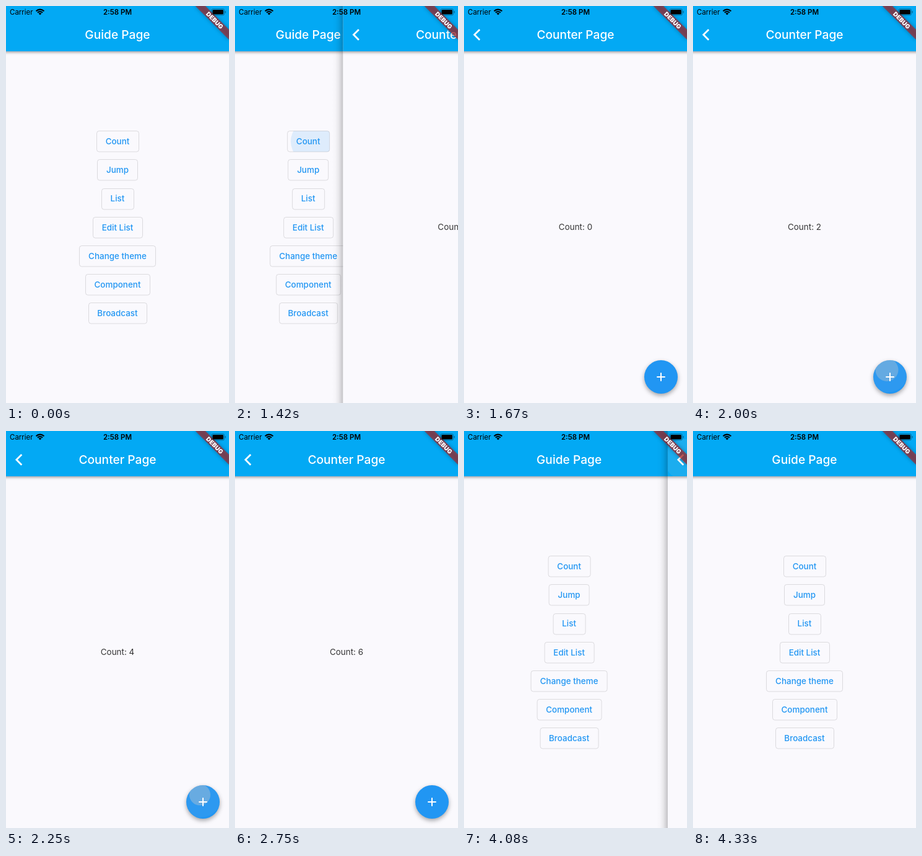
An HTML page with a canvas for the animation above (5080 ms loop, 360 by 640 pixels).

```html
<!DOCTYPE html>
<html lang="en">
<head>
<meta charset="utf-8">
<title>Guide and counter pages</title>
<style>
  html, body { margin: 0; width: 100%; height: 100%; overflow: hidden; background: #faf9fd; }
  canvas { display: block; }
</style>
</head>
<body>
<canvas id="stage" width="360" height="640"></canvas>
<script>
const ctx = document.getElementById('stage').getContext('2d');
const W = 360, H = 640, LOOP = 5080, STEP = 1000 / 12;
const BACKGROUND = '#faf9fd', HEADER = '#03a9f4', ACCENT = '#2196f3';
const HEADER_HEIGHT = 73, HEADER_MID = 46.2;
const MENU = ['Count', 'Jump', 'List', 'Edit List', 'Change theme', 'Component', 'Broadcast'];

const PUSH = { start: 1354.4, duration: 310 };
const POP = { start: 3859, duration: 460 };
const FIRST_SLIDE = 1416, FIRST_RETURN = 3916;
const TAPS = [1790, 1910, 2040, 2170, 2340, 2500];
const TAP_HOLD = 75, RIPPLE_LIFE = 240;

const clamp = v => Math.max(0, Math.min(1, v));

// Cubic Bezier (0.35, 0.91, 0.33, 0.97), solved by bisection.
function slideEase(t) {
  if (t <= 0 || t >= 1) return clamp(t);
  const bezier = (a, b, s) => 3 * (1 - s) ** 2 * s * a + 3 * (1 - s) * s * s * b + s ** 3;
  let low = 0, high = 1;
  for (let i = 0; i < 30; i++) {
    const mid = (low + high) / 2;
    if (bezier(0.35, 0.33, mid) < t) low = mid; else high = mid;
  }
  return bezier(0.91, 0.97, low);
}

const progress = (slide, time) => slideEase((time - slide.start) / slide.duration);

function scoped(draw) {
  ctx.save();
  draw();
  ctx.restore();
}

function setShadow(offset, blur, alpha) {
  ctx.shadowOffsetY = offset;
  ctx.shadowBlur = blur;
  ctx.shadowColor = `rgba(0,0,0,${alpha})`;
}

function label(text, x, mid, size, color, weight = 400, align = 'center') {
  ctx.font = `${weight} ${size}px Inter, sans-serif`;
  ctx.textAlign = align;
  ctx.fillStyle = color;
  ctx.fillText(text, x, mid + size * 0.364);
}

function circle(x, y, r, color) {
  ctx.beginPath();
  ctx.arc(x, y, r, 0, 2 * Math.PI);
  ctx.fillStyle = color;
  ctx.fill();
}

function strokeLine(points, width, color) {
  ctx.beginPath();
  points.forEach(([x, y]) => ctx.lineTo(x, y));
  ctx.lineWidth = width;
  ctx.strokeStyle = color;
  ctx.stroke();
}

function pageBase(title) {
  ctx.fillStyle = BACKGROUND;
  ctx.fillRect(0, 0, W, H);
  scoped(() => {
    ctx.beginPath();
    ctx.rect(0, 0, W, H);
    ctx.clip();
    setShadow(1.5, 4, 0.35);
    ctx.fillStyle = HEADER;
    ctx.fillRect(-10, -10, W + 20, HEADER_HEIGHT + 10);
  });
  label(title, W / 2, HEADER_MID, 19.2, '#fff', 500);
}

function menuButton(text, index, time) {
  const mid = 218.4 + index * 46.08, height = 34;
  ctx.font = '500 13.44px Inter, sans-serif';
  const width = Math.round(ctx.measureText(text).width + 30);
  const left = Math.round(W / 2 - width / 2) + 0.5;
  ctx.beginPath();
  ctx.roundRect(left, Math.round(mid - height / 2) + 0.5, width - 1, height - 0.5, 3.8);
  if (index === 0 && time > FIRST_SLIDE && time < 1700) {
    scoped(() => {
      const age = time - FIRST_SLIDE;
      ctx.clip();
      circle(186, mid, 34 + age * 0.2, `rgba(33,150,243,${0.13 * clamp(1 - age / 280)})`);
    });
    ctx.beginPath();
    ctx.roundRect(left, Math.round(mid - height / 2) + 0.5, width - 1, height - 0.5, 3.8);
  }
  ctx.lineWidth = 1;
  ctx.strokeStyle = 'rgba(0,0,0,0.12)';
  ctx.stroke();
  label(text, W / 2, mid, 13.44, ACCENT, 500);
}

function guidePage(time) {
  pageBase('Guide Page');
  MENU.forEach((text, i) => menuButton(text, i, time));
}

function addButton(time) {
  const x = 318, y = 598, r = 27;
  scoped(() => {
    setShadow(3, 7, 0.35);
    circle(x, y, r, ACCENT);
  });
  scoped(() => {
    ctx.beginPath();
    ctx.arc(x, y, r, 0, 2 * Math.PI);
    ctx.clip();
    for (const tap of TAPS) {
      const age = time - tap;
      if (age <= 0 || age >= RIPPLE_LIFE) continue;
      const fade = clamp((RIPPLE_LIFE - age) / 160);
      circle(313, 586.5, 5 + age * 0.15, `rgba(200,200,200,${0.38 * fade})`);
    }
  });
  strokeLine([[x - 6.7, y], [x + 6.7, y]], 2, '#fff');
  strokeLine([[x, y - 6.7], [x, y + 6.7]], 2, '#fff');
}

function counterPage(time) {
  pageBase('Counter Page');
  const age = time - FIRST_RETURN;
  if (age > 0 && age < 250) {
    scoped(() => {
      ctx.beginPath();
      ctx.rect(0, 0, W, HEADER_HEIGHT);
      ctx.clip();
      circle(28, HEADER_MID, 33.3, `rgba(200,200,200,${0.36 * (1 - age / 250)})`);
    });
  }
  strokeLine([[25.3, 37.9], [16.9, 46.3], [25.3, 54.7]], 2.8, '#fff');
  const count = TAPS.filter(tap => time >= tap + TAP_HOLD).length;
  label(`Count: ${count}`, W / 2, 356.5, 13.44, 'rgba(0,0,0,0.8)');
  addButton(time);
}

function edgeShadow() {
  const gradient = ctx.createLinearGradient(-18, 0, 0, 0);
  [[0, 0], [0.3, 0.016], [0.6, 0.07], [1, 0.22]].forEach(([stop, alpha]) =>
    gradient.addColorStop(stop, `rgba(0,0,0,${alpha})`));
  ctx.fillStyle = gradient;
  ctx.fillRect(-18, 0, 18, H);
}

function debugBanner() {
  scoped(() => {
    ctx.translate(W, 0);
    ctx.rotate(Math.PI / 4);
    setShadow(0, 6, 0.5);
    ctx.fillStyle = 'rgba(183,28,28,0.627)';
    ctx.fillRect(-38.4, 26.9, 76.8, 11.5);
    ctx.shadowColor = 'transparent';
    label('DEBUG', 0, 32.6, 9.8, '#fff', 900);
  });
}

function statusBar() {
  label('Carrier', 6, 10, 11.5, '#000', 400, 'left');
  label('2:58 PM', W / 2, 10, 11.5, '#000', 600);
  const arc = r => ctx.arc(55, 14.4, r, -Math.PI * 0.76, -Math.PI * 0.24);
  ctx.strokeStyle = ctx.fillStyle = '#000';
  ctx.lineWidth = 2.1;
  for (const r of [5.4, 8.8]) {
    ctx.beginPath();
    arc(r);
    ctx.stroke();
  }
  ctx.beginPath();
  ctx.moveTo(55, 14.4);
  arc(3.2);
  ctx.fill();

  ctx.beginPath();
  ctx.roundRect(332, 4.5, 20.5, 10.5, 2.8);
  ctx.lineWidth = 1;
  ctx.strokeStyle = 'rgba(0,0,0,0.35)';
  ctx.stroke();
  ctx.beginPath();
  ctx.roundRect(333.5, 6, 17.5, 7.5, 1.5);
  ctx.fill();
  ctx.fillStyle = 'rgba(0,0,0,0.4)';
  ctx.fillRect(353.5, 8, 1.2, 3.5);
}

function render(time) {
  const open = time < FIRST_SLIDE ? 0
    : time < FIRST_RETURN ? progress(PUSH, time)
    : 1 - progress(POP, time);
  const x = W * (1 - open);
  ctx.clearRect(0, 0, W, H);
  scoped(() => {
    ctx.translate(-W * open / 3, 0);
    guidePage(time);
  });
  if (open > 0) {
    scoped(() => {
      ctx.translate(x, 0);
      edgeShadow();
      counterPage(time);
    });
  }
  debugBanner();
  statusBar();
}

// The picture advances twelve times a second.
function tick() {
  const time = performance.now() % LOOP;
  render(Math.floor((time + 3.4) / STEP) * STEP);
  requestAnimationFrame(tick);
}
tick();
</script>
</body>
</html>
```
